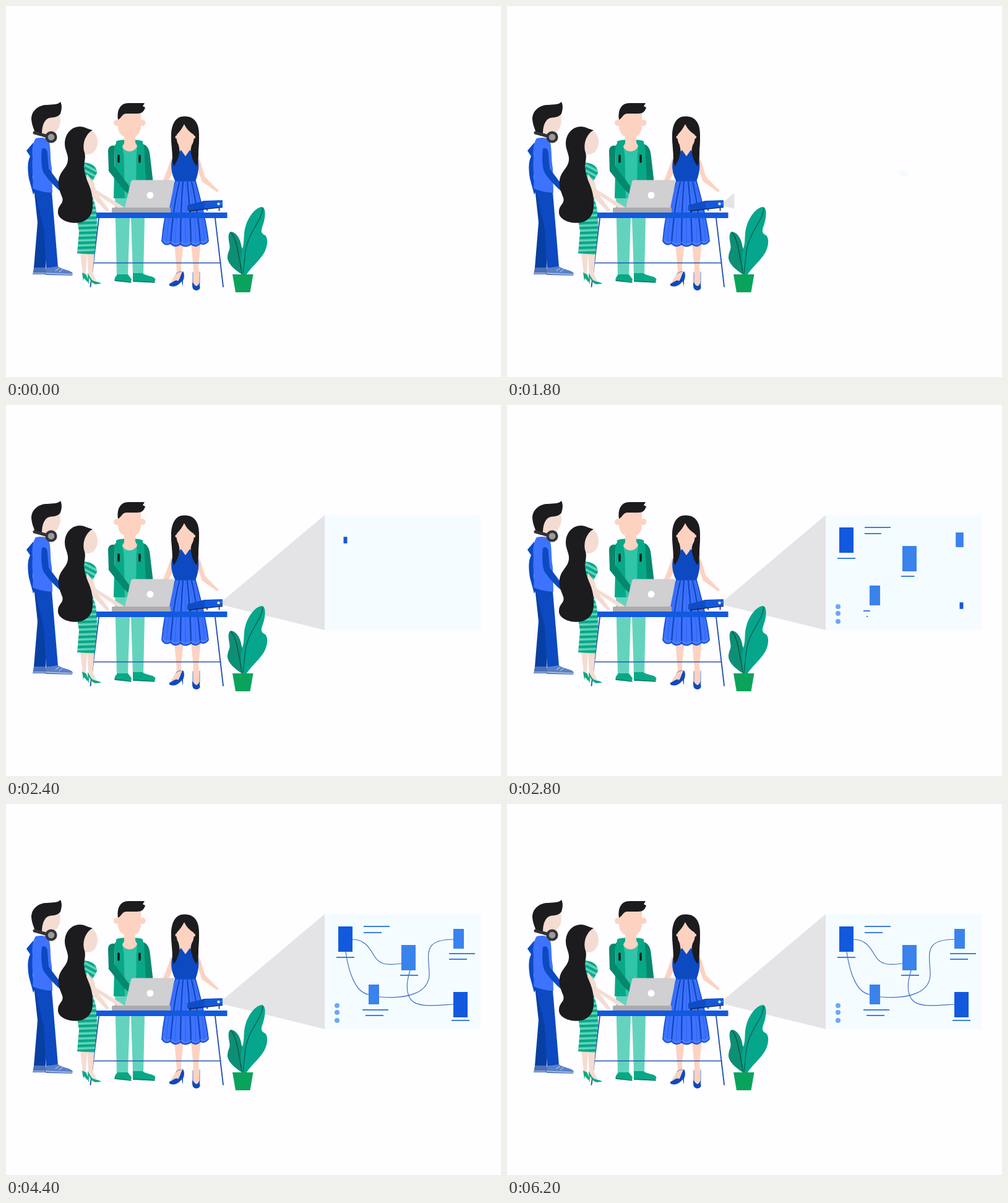
An HTML page for the animation above (6.3 s loop, 800 by 600 pixels).

```html
<!DOCTYPE html>
<html lang="en">
<head>
<meta charset="utf-8">
<title>Team presentation</title>
<style>
html, body { margin: 0; width: 100%; height: 100%; overflow: hidden; background: #fefdff; }
svg { display: block; width: 800px; height: 600px; }
.hair { fill: #1c1c1e; }
.pale { fill: #f4dcd2; }
.skin { fill: #fdd2c1; }
.navy { fill: #0d49c0; }
.royal { fill: #1259de; }
.sky { fill: #3d73ff; }
.teal { fill: #08a886; }
.deep { fill: #05886d; }
.mint { fill: #64d3bd; }
.shirt { fill: #30c4a8; }
.line { fill: none; stroke-linecap: round; stroke-linejoin: round; }
</style>
</head>
<body>
<svg viewBox="0 0 800 600">
<defs>
  <pattern id="stripes" width="40" height="8" y="1" patternUnits="userSpaceOnUse" patternTransform="rotate(-2)">
    <rect width="40" height="8" fill="#64d3bd"/><rect width="40" height="4.4" fill="#08a886"/>
  </pattern>
  <pattern id="sleeve" href="#stripes" patternTransform="rotate(28)"/>
</defs>

<polygon id="beam" points="344,322 515,178 515,364" fill="#e4e3e6"/>
<rect id="screen" x="515" y="178" width="252" height="186" fill="#f5fcff"/>
<g id="links" class="line" stroke="#3d70cb" stroke-width="1.2">
  <path d="M560 219C578 219 586 230 594 244S612 262 639 258"/>
  <path d="M549 239C554 273 565 305 586 308"/>
  <path d="M603 312C650 316 686 305 684 272S676 219 723 219"/>
  <path d="M653 269C648 285 645 305 655 317S690 326 723 324"/>
</g>
<g id="board"></g>

<!-- man with headphones -->
<g>
  <path class="navy" d="M44 221L33 234L39 243C34 253 35 266 37 279L44 305L47 299L43 276L46 250Z"/>
  <path d="M45 294L68 299L64 423L45 423L51 350Z" fill="#083fa3"/>
  <path class="navy" d="M45 293L74 301L84 422L65 424L61 360Z"/>
  <path class="pale" d="M60 180C70 174 82 174 87 177C90 190 85 204 74 207L70 216L48 214L57 198Z"/>
  <path class="hair" d="M47 207C52 208 56 207 58 206C58 194 62 183 70 181C79 180 85 179 88 174C90 168 91 161 88 155C84 160 75 159 66 160C54 160 41 168 41 183C42 195 46 199 47 207Z"/>
  <path d="M49 208L58 211L65 217L47 216Z" fill="#fff"/>
  <path class="sky" d="M48 214C56 212 66 213 69 218C73 228 71 249 74 262L75 302C65 302 52 299 43 295C45 277 41 264 43 246C41 232 44 219 48 214Z"/>
  <path class="navy" d="M58 231C63 228 67 232 67 239L69 263L99 303L96 306C83 297 66 279 60 268C56 256 57 240 58 231Z"/>
  <path class="line" d="M46 205L68 211" stroke="#323234" stroke-width="5" stroke-linecap="butt"/>
  <circle cx="73" cy="212" r="9.6" fill="#343436"/><circle cx="73" cy="212" r="5.3" fill="#9b9a9d"/>
  <path d="M45 423L64 423L67 434L43 434Z" fill="#4c70b9"/>
  <path d="M65 424L84 421C91 427 107 427 108 433L107 436L64 435Z" fill="#5b80c6"/>
  <path class="line" d="M43 432H62M64 432L108 434M86 424L80 428M91 426L86 430" stroke="#e4ebf8" stroke-width=".9"/>
</g>

<!-- man in hoodie -->
<g>
  <path class="mint" d="M176 304H224V343L222 435H205L202 343H200L197 435H179Z"/>
  <path class="teal" d="M180 434H197L203 442L202 446L176 445C174 440 178 437 180 434ZM205 432H220C226 437 239 436 241.500 442L240 447L205 446Z"/>
  <path class="line" d="M176 444L202 447M206 445L240 447" stroke="#087b62" stroke-width="1.3"/>
  <path class="deep" d="M221 223C229 226 232 232 233 244L237.500 283H225Z"/>
  <path class="shirt" d="M188 224H213L219 311H184Z"/>
  <path class="teal" d="M176 224L190 222L192 311H174ZM211 223L223 224L226 284L227 311H210Z"/>
  <path class="teal" d="M178 219C182 215 218 215 221 219L222 232C214 236 186 236 177 231Z"/>
  <path class="shirt" d="M188 226H212L211 240H190Z"/>
  <path class="skin" d="M191 205H209V221L212 226C209 238 191 238 188 227L191 222Z"/>
  <circle class="skin" cx="179" cy="189" r="5"/><circle class="skin" cx="220.500" cy="189" r="5"/>
  <path class="skin" d="M181 171H218V194C218 206 211 213 200 213C188 213 181 206 181 194Z"/>
  <path class="hair" d="M181 184C179 169 184 157 198 157H224L221 162L225 164C223 171 219 174 212 174H194C187 175 187 181 181 184Z"/>
  <path class="deep" d="M165 235C165 226 171 225 176 226L175 259L199 291L198 304L190 297L166 267Z"/>
  <path class="line" d="M182 242V252M216 242V252" stroke="#111a1a" stroke-width="3.500"/>
</g>

<!-- woman in blue dress -->
<g>
  <path class="skin" d="M267 246C262 263 256 276 252 287L258 291L272 264ZM311 245C317 256 318 268 322 277L344 299L341 301L317 284L309 262Z"/>
  <path class="skin" d="M272 382H287L283 421L284 447H266L276 430ZM299 382H315L311 420L313 454H302L303 426Z"/>
  <path class="navy" d="M264 449C270 447 275 441 278 445C282 440 283 431 286 429C289 433 288 441 286 444L286 454L284 445C279 452 271 456 264 452ZM301 450C301 442 303 452 308 453C312 452 314 442 313 452C315 458 311 460 307 460C302 459 301 456 301 450Z"/>
  <path class="line" d="M275 433C279 429 285 428 286 433M302 448V431M313 448V430" stroke="#3e5cae" stroke-width=".8"/>
  <path class="hair" d="M290 178.500C275 177 267 190 267 210C267 226 269 236 269 247H310C310 236 312 226 312 208C312 190 305 179 290 178.500Z"/>
  <path class="skin" d="M279 222H300L302 242L290 250L278 242Z"/>
  <path class="navy" d="M269 246L283 233L290 243L297 233L310 246C313 258 311 271 306 284H274C268 273 265 260 269 246Z"/>
  <path class="hair" d="M267 212H275C277 222 282 230 280 238C278 247 276 253 271 259C268 252 269 243 269 236ZM312 212H304C302 222 297 230 299 238C301 247 303 253 308 259C311 252 311 243 311 236Z"/>
  <circle class="skin" cx="276" cy="212" r="2.500"/><circle class="skin" cx="303.500" cy="212" r="2.500"/>
  <path class="skin" d="M276 208C281 203 285 197 288 191C291 198 297 204 303.500 208C305 222 299 230 290 230C281 230 274 222 276 208Z"/>
  <path class="sky" d="M274 283H306C313 308 323 344 327 380Q321 388 314 384Q307 392 299 385Q290 392 282 385Q274 392 266 384Q257 389 252 380C255 344 264 308 274 283Z" stroke="#1650ce" stroke-width="1.800"/>
  <path class="line" d="M280 285Q270 326 266 383M286 285Q282 330 282 385M293 285Q298 330 299 385M300 285Q310 326 314 383" stroke="#1047bd" stroke-width="2.300"/>
  <path class="line" d="M276 287Q263 329 259 381M283 287Q275 334 273 384M290 287V384M297 287Q306 334 307 384M303 287Q317 329 321 381" stroke="#2c62ec" stroke-width="1"/>
  <path class="line" d="M253 377Q259 385 266 381Q274 388 282 382Q290 389 299 382Q307 388 314 381Q321 385 326 377" stroke="#7ba0ff" stroke-width=".7"/>
</g>

<!-- table -->
<g>
  <path class="line" d="M150 343L136.500 454M338 343L351 454" stroke="#2153ad" stroke-width="1.900"/>
  <path class="line" d="M141 415.500H347" stroke="#2153ad" stroke-width="1.300"/>
</g>

<!-- woman in striped dress -->
<g>
  <path class="pale" d="M120 399H131L129 432L137 445L130 444L124 432ZM131 399H143L140 432L147 447L140 446L133 434Z"/>
  <path class="teal" d="M123 431L129 434L133 443L132 447L126 440L125 445ZM132 432L138 442C143 447 149 445 154 449L145 450C139 449 137 444 134 440L134 449L133 449Z"/>
  <path d="M126 253C137 254 146 260 147 270L140 283L133 284L142 315C148 333 147 347 147 358L143 402L115 400L118 365L114 339L122 270Z" fill="url(#stripes)"/>
  <path class="pale" d="M132 270L141 282L145 297L184 321L194 328L180 326L149 306L167 330L163 333L139 308L129 282Z"/>
  <path d="M127 254C138 253 147 260 147 270L139 283L128 267Z" fill="url(#sleeve)"/>
  <ellipse class="pale" cx="132" cy="220" rx="16" ry="20"/>
  <path class="hair" d="M95 223C95 201 114 189 131 198L140 201C131 205 123 219 126 234C131 247 124 253 127 267C129 282 137 291 139 306C142 328 140 342 124 349C108 354 86 348 84 335C83 321 94 321 91 310C87 299 82 291 86 277C91 263 101 260 100 245C99 237 95 231 95 223Z"/>
</g>

<rect class="royal" x="146" y="334" width="211.500" height="9"/>

<!-- laptop -->
<path d="M205 281.500H271Q273 281.500 272.500 284L264 326H192L202 284Q202.500 281.500 205 281.500Z" fill="#d0cfd2"/>
<path d="M173 326H266V334H171V328Q171 326 173 326Z" fill="#acabad"/>
<circle cx="233" cy="306" r="5.500" fill="#fff"/>

<!-- projector -->
<path d="M294 329L350 324V326L297 332Z" fill="#17213c"/>
<path class="line" d="M298 330V333M325 328V331M344.500 326V331" stroke="#17213c" stroke-width="1.500"/>
<path d="M293 322L320 315L350 314L321 320V328L293 331Z" fill="#0f4dc6"/>
<path class="royal" d="M321 317L350 314V325L321 328Z"/>
<circle cx="343.500" cy="320" r="2.200" fill="#e8f0ff"/><circle cx="348" cy="319" r=".8" fill="#a7c5ff"/>

<!-- plant -->
<path d="M381 434C371 427 357 417 358 405C359 396 363 394 361 385C359 374 359 367 363 365C371 365 378 375 380 386C381 394 385 396 384 406Z" fill="#0d8f76"/>
<path d="M383 434C379 418 379 405 382 392C386 382 383 370 387 357C391 342 403 325 414 325C421 327 419 344 415 355C411 365 413 368 419 371C425 377 422 394 414 404C406 415 395 424 389 434Z" fill="#05a68c"/>
<path class="line" d="M364 367C374 378 376 408 382 434" stroke="#075344" stroke-width="1.200"/>
<path class="line" d="M415 327C413 351 389 365 386 405L383 434" stroke="#08614e" stroke-width="1.300"/>
<path d="M366 434H399.500L394.500 463H371Z" fill="#0aa35c"/>
</svg>

<script>
const LOOP = 6300, STEP = 100;
const $ = id => document.getElementById(id);
const board = $('board');
const parts = [];

// ease-in-out progress of a move
const ease = (t, start, length) => {
  const p = Math.min(1, Math.max(0, (t - start) / length));
  return p * p * (3 - 2 * p);
};

// scales an element about a point
function grow(el, x, y, start, length, flat) {
  parts.push(t => {
    const s = ease(t, start, length);
    el.style.display = s ? '' : 'none';
    el.setAttribute('transform',
      `translate(${x} ${y}) scale(${s} ${flat ? 1 : s}) translate(${-x} ${-y})`);
  });
}

function add(tag, attrs) {
  const el = document.createElementNS('http://www.w3.org/2000/svg', tag);
  for (const key in attrs) el.setAttribute(key, attrs[key]);
  return board.appendChild(el);
}

function card(x, y, big, fill, start) {
  const width = big ? 23 : 17, height = big ? 41 : 32;
  grow(add('rect', { x, y, width, height, fill }), x + width / 2, y + height / 2, start, 300);
}

function bar(x, y, width, start) {
  grow(add('rect', { x, y: y - 1, width, height: 2, fill: '#3b7fe2' }), x, y, start, 300, true);
}

const DARK = '#1259de', LIGHT = '#3a82ec';
grow($('beam'), 344, 322, 1690, 476);
grow($('screen'), 641, 271, 1700, 700);

card(537, 198, true, DARK, 2300);
card(639, 228, true, LIGHT, 2400);
card(586, 292, false, LIGHT, 2500);
card(723, 202, false, LIGHT, 2600);
card(723, 304, true, DARK, 2700);

bar(534, 248, 29, 2500);
bar(578, 198, 42, 2500);
bar(578, 208, 29, 2550);
bar(637, 277, 29, 2600);
bar(576, 333, 42, 2700);
bar(581, 342, 29, 2750);
bar(716, 242, 42, 2800);
bar(716, 251, 29, 2850);
bar(720, 350, 29, 2900);

for (const cy of [326, 337, 350])
  grow(add('circle', { cx: 535, cy, r: 4, fill: '#6ea8f2' }), 535, cy, 2370, 300);

parts.push(t => $('links').setAttribute('opacity', ease(t, 2900, 600)));

function draw(now) {
  const t = Math.floor(now % LOOP / STEP) * STEP;
  parts.forEach(part => part(t));
}

const begin = performance.now();
function tick() {
  draw(performance.now() - begin);
  requestAnimationFrame(tick);
}
tick();
</script>
</body>
</html>
```
